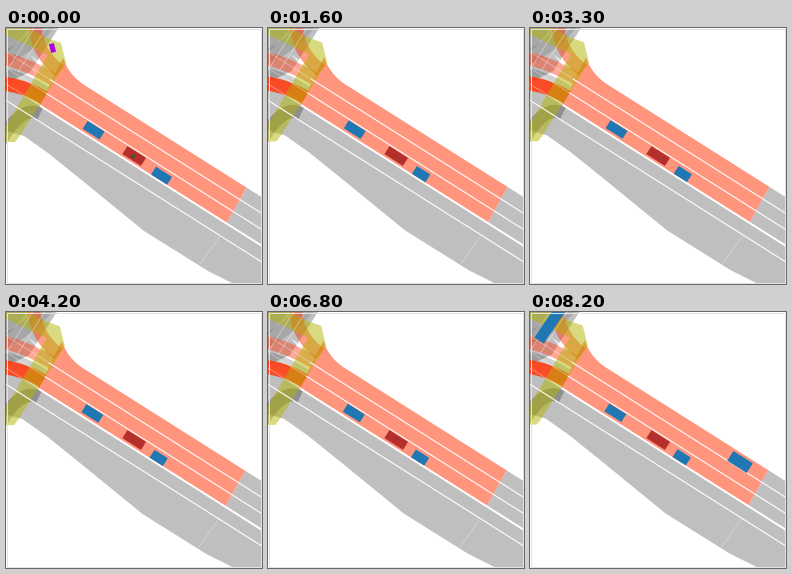
Recreate the animation shown at these times as a matplotlib script. Size 256 px wide and 256 px high, loop 8.3 s.

```python
import math
import numpy as np
import matplotlib.pyplot as plt
from matplotlib.animation import FuncAnimation
from matplotlib.patches import Polygon, Rectangle

SIZE, FRAMES, STEP = 256, 83, 100
PX = 0.72  # points per pixel
SLOPE, LANE = 0.632, 16.2
HEADING = math.atan(SLOPE)
CROSS = math.radians(56)
BLUE, EGO_RED, PURPLE = "#1f77b4", "#b5302c", "#b000f0"
SALMON, RED, OLIVE = "#ff957d", "#ff3c14", "#b4b400"

fig = plt.figure(figsize=(2.56, 2.56), dpi=100, facecolor="white")
ax = fig.add_axes([0, 0, 1, 1])
ax.axis("off")


def shape(points, color, alpha=1.0, z=1):
    ax.add_patch(Polygon(points, closed=True, fc=color, ec="none", lw=0,
                         alpha=alpha, zorder=z))


def curve(p0, p1, p2, n=20):
    t = np.linspace(0, 1, n)[:, None]
    p0, p1, p2 = map(np.array, (p0, p1, p2))
    return (1 - t) ** 2 * p0 + 2 * t * (1 - t) * p1 + t ** 2 * p2


def ribbon(p0, p1, p2, width, color, alpha, z=2):
    """Band of constant width along a quadratic curve."""
    mid = curve(p0, p1, p2)
    tangent = np.gradient(mid, axis=0)
    tangent /= np.linalg.norm(tangent, axis=1, keepdims=True)
    side = np.column_stack([-tangent[:, 1], tangent[:, 0]]) * width / 2
    shape(np.vstack([mid + side, (mid - side)[::-1]]), color, alpha, z)


def stroke(start, end, width=1.0, alpha=1.0):
    ax.plot(*zip(start, end), color="white", lw=width * PX, alpha=alpha,
            zorder=4, solid_capstyle="butt")


def lane(x, k):
    """Point on the k-th lane edge, counted from the centre line."""
    return x, 195.5 + SLOPE * (x - 220.5) + k * LANE


def box(length, width, angle, color):
    return ax.add_patch(Rectangle((0, 0), length, width, angle=math.degrees(angle),
                                  rotation_point="center", fc=color, ec="none",
                                  lw=0, zorder=6))


def place(rect, x, y):
    rect.set_xy((x - rect.get_width() / 2, y - rect.get_height() / 2))


# Main road: far carriageway, then the stretch beyond the stopped lanes
shape([lane(-10, 0), lane(275, 0), (275, 275), (228, 256), (202, 243), (138, 203),
       (78, 154), (42, 125), (18, 108), (-10, 100)], "black", 0.25)
shape([lane(240.5, -3), lane(275, -3), lane(275, 0), lane(220.5, 0)], "black", 0.25)

# Crossing road with overlapping turn lanes
shape([(-10, -10), (59, -10), (24, 44), (-10, 60)], "black", 0.25)
ribbon((46, -10), (28, 18), (-10, 34), 14, "black", 0.12, 1)
ribbon((20, -10), (8, 8), (-10, 24), 16, "black", 0.12, 1)
ribbon((38, 66), (18, 52), (-10, 46), 16, "black", 0.18, 1)
ribbon((34, 86), (16, 76), (-6, 114), 13, "black", 0.25, 1)

# Stopped lanes and the connectors they feed
corner = curve((57, 30), (63, 47), lane(78, -3)).tolist()
shape(corner + [lane(240.5, -3), lane(220.5, 0), lane(33, 0), (42, 60)], SALMON, z=2)
ribbon((54, 43), (29, 24), (29, -6), 13, RED, 0.5)
ribbon((47, 51), (20, 35), (-10, 29), 13, RED, 0.45)
ribbon((38, 70), (18, 57), (-10, 55), 14, RED, 0.9)
shape([(24, 27), (30, 31), (38, 42)], "white", 0.75, 2)

# Crosswalk bending round the corner
shape([(-10, -14), (22, -1), (38, 9), (55, 15), (60, 35), (13, 109), (9, 114),
       (-10, 114), (0, 98), (42, 27), (-10, 2)], OLIVE, 0.5, 3)

# Markings
for k, start, width in [(-2, 44, 1.1), (-1, 40, 1.1), (0, 34, 2.0), (1, 0, 1.1)]:
    stroke(lane(start, k), lane(275, k), width)
    stroke(lane(-8, k), lane(start, k), 0.8, 0.4)
for x in (44, 32):
    stroke((x, -6), (x - 32, 44), 0.8, 0.45)
stroke((214, 208), (194, 236), 0.8, 0.35)

# Road users
lead = box(20, 9.3, HEADING, BLUE)
follower = box(19, 9.3, HEADING, BLUE)
ego = box(22, 9.5, HEADING, EGO_RED)
arrival = box(23, 11.5, HEADING, BLUE)
bus = box(40, 11, -CROSS, BLUE)
walker = box(5, 9, -0.26, PURPLE)
dot, = ax.plot([], [], "o", color="#3f5a24", mew=0, zorder=7)

ax.add_patch(Rectangle((0.002, 0.002), 0.996, 0.996, transform=ax.transAxes,
                       fc="none", ec="#e2e2e2", lw=PX, zorder=9))


def update(i):
    t = i * STEP / 1000
    left = (FRAMES - 1 - i) * STEP / 1000

    # The view follows the creeping ego car
    settle = 1 - math.exp(-2 * t)
    creep = settle + 0.025 * t * t
    dx, dy = creep * math.cos(HEADING), creep * math.sin(HEADING)
    ax.set_xlim(dx, SIZE + dx)
    ax.set_ylim(SIZE + dy, dy)
    place(ego, 128.2 + dx, 128 + dy)
    place(lead, 87.6, 102.2)

    follower.set_width(19 - 3.3 * settle)
    back = 1.6 * settle
    place(follower, 155.5 - back, 147.7 - SLOPE * back)

    glow = (0.5 + 0.5 * math.cos(2 * math.pi * t / 5.5)) ** 2
    dot.set_data([127 + dx], [127.5 + dy])
    dot.set_markersize((1.5 + 2.5 * glow) * PX)
    dot.set_alpha(0.2 + 0.8 * glow)

    # Braking arrival and the bus crossing at constant speed
    run = 45 * left + 6 * left ** 2
    place(arrival, 212.3 + run * math.cos(HEADING), 151.4 + run * math.sin(HEADING))
    ride = 50 * left
    place(bus, 22.5 - ride * math.cos(CROSS), 13.5 + ride * math.sin(CROSS))

    place(walker, 46.5 + 2 * t, 20 - 3 * t)
    walker.set_visible(t < 0.7)
    return []


anim = FuncAnimation(fig, update, frames=FRAMES, interval=STEP, repeat=True,
                     repeat_delay=0, blit=False, init_func=lambda: update(0))
plt.show()
```
